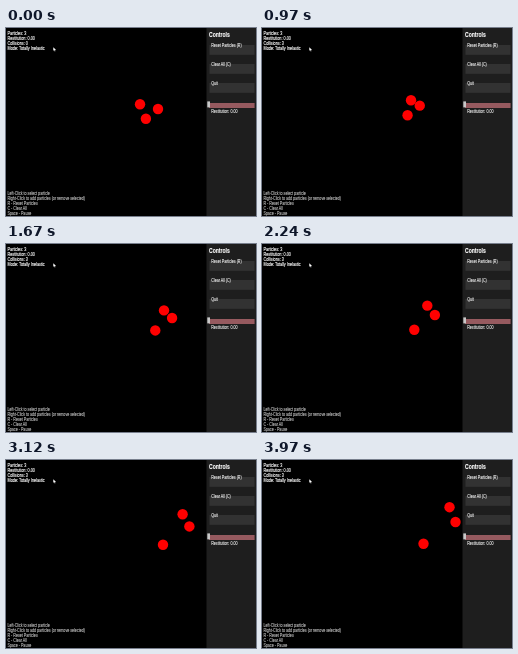
Animation of 250x188 px, one loop 4 s. Source, as an HTML page:

```html
<!DOCTYPE html>
<html lang="en">
<head>
<meta charset="utf-8">
<title>Particle collisions</title>
<style>
  html, body { margin: 0; width: 100%; height: 100%; overflow: hidden; background: #000; }
  svg { display: block; width: 100vw; height: 100vh; }
  text { font: 5px "Liberation Sans", Arial, sans-serif; stroke-width: .16px; }
  .stats text { font-size: 5.2px; fill: #fff; stroke: #fff; }
  .help text { fill: #b4b4b4; stroke: #b4b4b4; }
  .panel text { fill: #e4e4e4; stroke: #e4e4e4; }
  .panel .title { font-size: 6.9px; font-weight: bold; fill: #fff; stroke: #fff; }
  .button { fill: #323232; }
  .ball { fill: #f00; }
</style>
</head>
<body>
<svg viewBox="0 0 250 188" preserveAspectRatio="none">
  <rect width="250" height="188"/>
  <g id="balls"></g>
  <g id="stats" class="stats"></g>
  <g id="help" class="help"></g>
  <path d="M47.3 19.2v3.6l.9-.7.6 1.3.7-.3-.6-1.2h1.1z" fill="#fff"/>
  <g id="panel" class="panel">
    <rect x="200.5" width="49.5" height="188" fill="#1e1e1e"/>
    <rect class="button" x="203.5" y="17" width="45" height="9.8"/>
    <rect class="button" x="203.5" y="36" width="45" height="9.8"/>
    <rect class="button" x="203.5" y="55" width="45" height="9.8"/>
    <rect x="203" y="75" width="45.6" height="5" fill="#965a5f"/>
    <rect x="201.3" y="73.4" width="2.7" height="6" fill="#c8c8c8"/>
  </g>
</svg>
<script>
const NS = "http://www.w3.org/2000/svg";
const LOOP = 4000;
const CONDENSED = 0.73; // one narrow face for all labels

function add(parent, tag, attrs) {
  const el = document.createElementNS(NS, tag);
  for (const key in attrs) el.setAttribute(key, attrs[key]);
  return document.getElementById(parent).appendChild(el);
}

function label(parent, x, y, content, cls = "") {
  const el = add(parent, "text", {
    class: cls,
    transform: `translate(${x} ${y}) scale(${CONDENSED} 1)`
  });
  el.textContent = content;
  return el;
}

const stats = ["Particles: 3", "Restitution: 0.00", "Collisions: 0", "Mode: Totally Inelastic"]
  .map((line, i) => label("stats", 1.5, 6.7 + i * 5.1, line));

["Left-Click to select particle",
 "Right-Click to add particles (or remove selected)",
 "R - Reset Particles",
 "C - Clear All",
 "Space - Pause"].forEach((line, i) => label("help", 1.4, 166.5 + i * 5.1, line));

label("panel", 203, 8.5, "Controls", "title");
["Reset Particles (R)", "Clear All (C)", "Quit"]
  .forEach((line, i) => label("panel", 205.2, 19.2 + i * 19, line));
label("panel", 205.2, 85.1, "Restitution: 0.00");

// Straight runs between contacts: [time, x, y]
const paths = [
  [[0, 134, 76.2], [440, 142.2, 76.7], [3970, 187.5, 47.2]],
  [[0, 152, 81], [440, 151.4, 80.4], [3970, 193.5, 62]],
  [[0, 139.9, 90.8], [430, 142.7, 87.9], [3970, 161.5, 83.7]]
];
const balls = paths.map(() => add("balls", "circle", { class: "ball", r: 5.2 }));

function position(path, t) {
  const i = t < path[1][0] ? 0 : 1;
  const [t0, x0, y0] = path[i];
  const [t1, x1, y1] = path[i + 1];
  const k = (t - t0) / (t1 - t0);
  return [x0 + (x1 - x0) * k, y0 + (y1 - y0) * k];
}

function draw(now) {
  const t = now % LOOP;
  paths.forEach((path, i) => {
    const [x, y] = position(path, t);
    balls[i].setAttribute("cx", x);
    balls[i].setAttribute("cy", y);
  });
  const hits = t < 430 ? 0 : t < 440 ? 1 : 3;
  stats[2].textContent = "Collisions: " + hits;
}

const start = performance.now();
function tick() {
  draw(performance.now() - start);
  requestAnimationFrame(tick);
}
tick();
</script>
</body>
</html>
```
